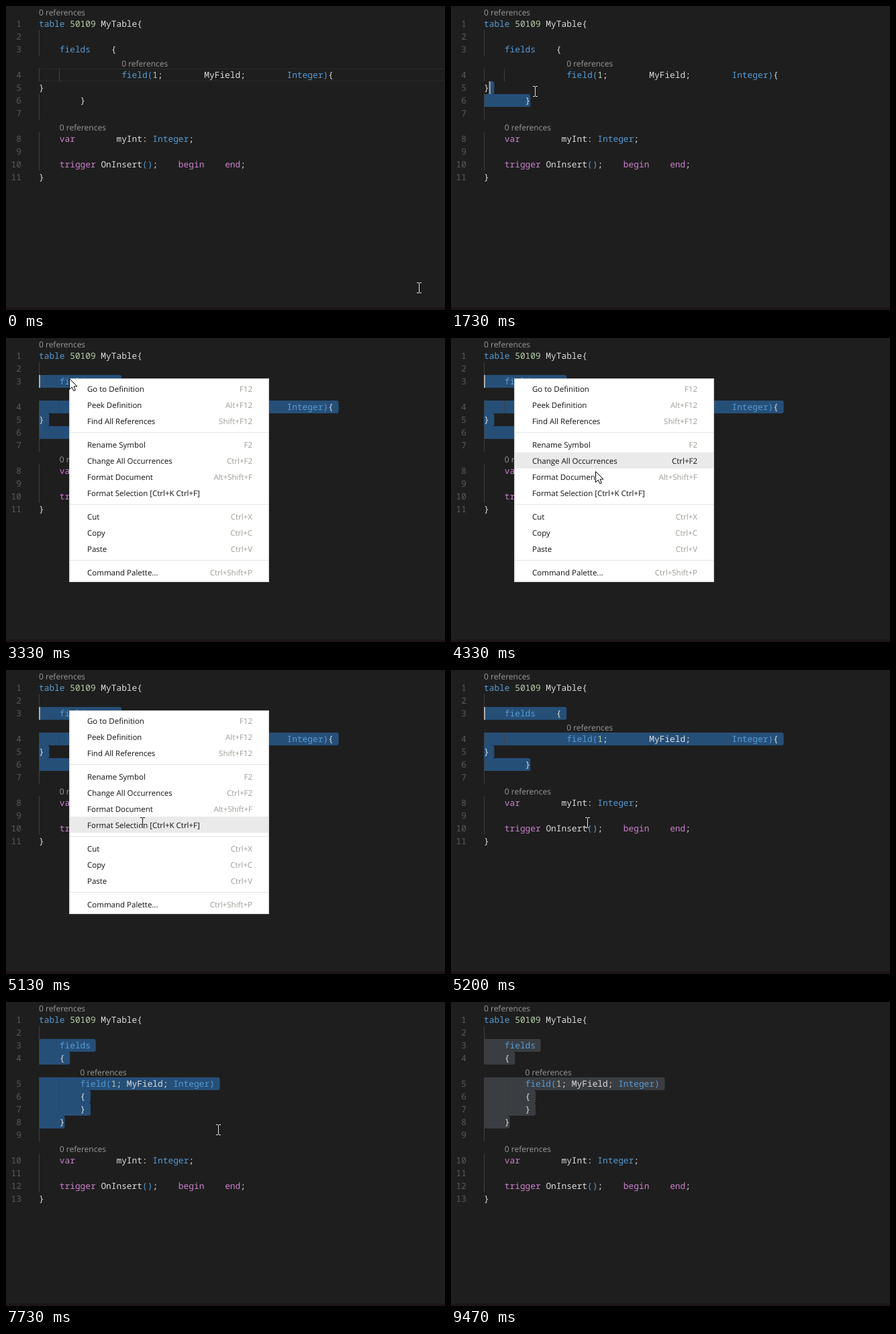
An HTML page for the animation above (9590 ms loop, 654 by 452 pixels).

```html
<!DOCTYPE html>
<html lang="en">
<head>
<meta charset="utf-8">
<title>Format selection</title>
<style>
  html, body { margin: 0; width: 100%; height: 100%; overflow: hidden; background: #1e1e1e; }
  svg { display: block; width: 654px; height: 452px; }
  text { white-space: pre; text-rendering: geometricPrecision; }
  .code { font: 12.83px "Noto Sans Mono", monospace; fill: #dcdcdc; }
  .blue { fill: #569cd6; }
  .pink { fill: #cc82cc; }
  .num { fill: #b5cea8; }
  .gutter { fill: #5a5a5a; text-anchor: end; }
  .lens { font: 12px "Open Sans", sans-serif; fill: #999; }
  .guide { fill: #404040; }
  .item { font: 11.5px "Open Sans", sans-serif; fill: #111; }
  .keys { fill: #9c9c94; text-anchor: end; }
  .item rect { fill: none; }
  .hot .keys { fill: #111; }
  .item.hot rect { fill: #eaeaea; }
  .sel { fill: #264f78; }
  .sel.blur { fill: #3a3d41; }
  #ibeam { fill: #fff; mix-blend-mode: difference; }
</style>
</head>
<body>
<svg viewBox="0 0 654 452">
  <rect width="654" height="452" fill="#1e1e1e"/>
  <rect y="448" width="654" height="4" fill="#1d1519"/>
  <path id="current" fill="none" stroke="#2a2a2a"/>
  <path id="selection" class="sel"/>
  <g id="messy"></g>
  <g id="tidy"></g>
  <rect id="caret" width="2" height="19" fill="#aeafad"/>
  <g id="menu">
    <rect x="94.5" y="60.5" width="297" height="302" fill="#fff" stroke="#ccc"/>
  </g>
  <path id="ibeam" d="M-3-8h3v1h-3zM1-8h3v1h-3zM0-7h1v14h-1zM-3 7h3v1h-3zM1 7h3v1h-3z"/>
  <path id="arrow" d="M.5.5V16.5L4.2 13L6.8 18.6L9.4 17.5L7 12H12Z" fill="#fff" stroke="#000"/>
</svg>
<script>
const LOOP = 9590, TICK = 1000 / 15;
const LEFT = 49, CHAR = 7.7, ROW = 19;
const $ = id => document.getElementById(id);
const colX = col => LEFT + col * CHAR;

// lens: column of the hint above a line; deep: lines with a second guide
const docs = {
  messy: {
    lens: { 1: 0, 4: 16, 8: 4 }, deep: [4],
    lines: [
      "table 50109 MyTable{",
      "",
      "    fields    {",
      "                field(1;        MyField;        Integer){",
      "}",
      "        }",
      "",
      "    var        myInt: Integer;",
      "",
      "    trigger OnInsert();    begin    end;",
      "}"]
  },
  tidy: {
    lens: { 1: 0, 5: 8, 10: 4 }, deep: [5, 6, 7],
    lines: [
      "table 50109 MyTable{",
      "",
      "    fields",
      "    {",
      "        field(1; MyField; Integer)",
      "        {",
      "        }",
      "    }",
      "",
      "    var        myInt: Integer;",
      "",
      "    trigger OnInsert();    begin    end;",
      "}"]
  }
};

function paint(line) {
  const rule = /\b(table|fields?|Integer)\b|[()]|\b(var|trigger|begin|end)\b|\b\d+\b/g;
  return line.replace(rule, (word, blue, pink) => {
    const kind = pink ? "pink" : /\d/.test(word) ? "num" : "blue";
    return `<tspan class="${kind}">${word}</tspan>`;
  });
}

function buildDoc(name) {
  const doc = docs[name];
  let y = -2, html = "";
  doc.tops = doc.lines.map((line, i) => {
    const n = i + 1;
    if (n in doc.lens) {
      html += `<text class="lens" x="${colX(doc.lens[n])}" y="${y + 16}">0 references</text>`;
      y += ROW;
    }
    const guides = /^\S/.test(line) ? [] : doc.deep.includes(n) ? [0, 4] : [0];
    for (const g of guides)
      html += `<rect class="guide" x="${Math.floor(colX(g))}" y="${y}" width="1" height="${ROW}"/>`;
    html += `<text class="code gutter" x="23" y="${y + 14}">${n}</text>`;
    html += `<text class="code" x="${LEFT}" y="${y + 14}">${paint(line)}</text>`;
    y += ROW;
    return y - ROW;
  });
  $(name).innerHTML = html;
}

const menuItems = [
  [76, "Go to Definition", "F12"],
  [100, "Peek Definition", "Alt+F12"],
  [124, "Find All References", "Shift+F12"],
  [159, "Rename Symbol", "F2"],
  [183, "Change All Occurrences", "Ctrl+F2"],
  [207, "Format Document", "Alt+Shift+F"],
  [231, "Format Selection [Ctrl+K Ctrl+F]", ""],
  [266, "Cut", "Ctrl+X"],
  [290, "Copy", "Ctrl+C"],
  [314, "Paste", "Ctrl+V"],
  [349, "Command Palette...", "Ctrl+Shift+P"]
];

function buildMenu() {
  let html = "";
  for (const y of [140, 247, 330])
    html += `<rect x="95" y="${y}" width="296" height="1" fill="#e4e4e4"/>`;
  for (const [y, label, keys] of menuItems)
    html += `<g class="item"><rect x="95" y="${y - 13}" width="296" height="24"/>
      <text x="121" y="${y + 4}">${label}</text>
      <text class="keys" x="367" y="${y + 4}">${keys}</text></g>`;
  $("menu").insertAdjacentHTML("beforeend", html);
}

// Pointer path: tick, x, y
const path = [
  [0, 615, 419], [5, 259, 107], [6, 259, 107], [9, 215, 85], [14, 163, 135],
  [16, 163, 135], [17, 157, 143], [18, 157, 143], [19, 155, 144], [24, 155, 144],
  [27, 110, 118], [30, 27, 72], [32, 30, 73], [36, 30, 73], [41, 86, 60],
  [42, 86, 60], [44, 94, 60], [59, 94, 60], [65, 215, 198], [68, 208, 226],
  [71, 203, 227], [100, 203, 227], [112, 316, 190], [122, 316, 190], [131, 280, 470]
];

function pointer(tick) {
  const i = path.findIndex(p => p[0] > tick);
  if (i < 0) return path[path.length - 1].slice(1);
  const [t0, x0, y0] = path[i - 1], [t1, x1, y1] = path[i];
  const k = (tick - t0) / (t1 - t0);
  return [Math.round(x0 + (x1 - x0) * k), Math.round(y0 + (y1 - y0) * k)];
}

const caretFlips = [24, 38, 45, 47, 49, 86, 93, 101, 108, 116, 123, 131, 138, 142];

// Line index and column where the selection's moving end lies
function dragHead(tick, doc) {
  if (tick >= 30) return [2, 0];
  const [x, y] = pointer(tick);
  let row = 5;
  while (row > 2 && doc.tops[row] > y) row--;
  const col = Math.round((x - LEFT) / CHAR);
  return [row, Math.max(0, Math.min(col, doc.lines[row].length))];
}

function selectionPath(doc, head, last) {
  let d = "";
  for (let row = head[0]; row <= last; row++) {
    const from = row === head[0] ? head[1] : 0;
    const to = doc.lines[row].length + (row < last ? 1 : 0);
    if (to <= from) continue;
    const w = (to - from) * CHAR - 3;
    d += `M${colX(from)} ${doc.tops[row]}h${w}q3 0 3 3v${ROW - 6}q0 3 -3 3h${-w}z`;
  }
  return d;
}

const show = (id, on) => $(id).setAttribute("display", on ? "inline" : "none");
const place = (id, x, y) => $(id).setAttribute("transform", `translate(${x} ${y})`);

function draw(tick) {
  const formatted = tick >= 79;
  const doc = formatted ? docs.tidy : docs.messy;
  show("messy", !formatted);
  show("tidy", formatted);

  const last = formatted ? 7 : 5;
  const head = dragHead(tick, doc);
  const selecting = tick > 24;
  $("selection").setAttribute("d", selecting ? selectionPath(doc, head, last) : "");
  $("selection").classList.toggle("blur", tick === 47 || tick === 48 || tick >= 142);

  const top = doc.tops[tick < 24 ? 3 : 5];
  $("current").setAttribute("d", selecting ? "" : `M49.5 ${top + .5}H660V${top + 18.5}H49.5Z`);

  show("caret", caretFlips.filter(t => t <= tick).length % 2);
  place("caret", colX(head[1]), doc.tops[head[0]]);

  show("menu", tick >= 49 && tick < 78);
  const hoverY = pointer(Math.max(0, tick - 1))[1];
  document.querySelectorAll(".item").forEach((el, i) => {
    const y = menuItems[i][0];
    el.classList.toggle("hot", hoverY >= y - 12 && hoverY < y + 12);
  });

  const arrow = tick >= 50 && tick < 77;
  const [x, y] = pointer(tick);
  show("arrow", arrow);
  show("ibeam", !arrow);
  place("arrow", x, y);
  place("ibeam", x, y);
}

buildDoc("messy");
buildDoc("tidy");
buildMenu();

const start = performance.now();
let shown = -1;
function run() {
  const t = (performance.now() - start) % LOOP;
  const tick = Math.floor((t + 4) / TICK);
  if (tick !== shown) draw(shown = tick);
  requestAnimationFrame(run);
}
run();
</script>
</body>
</html>
```
